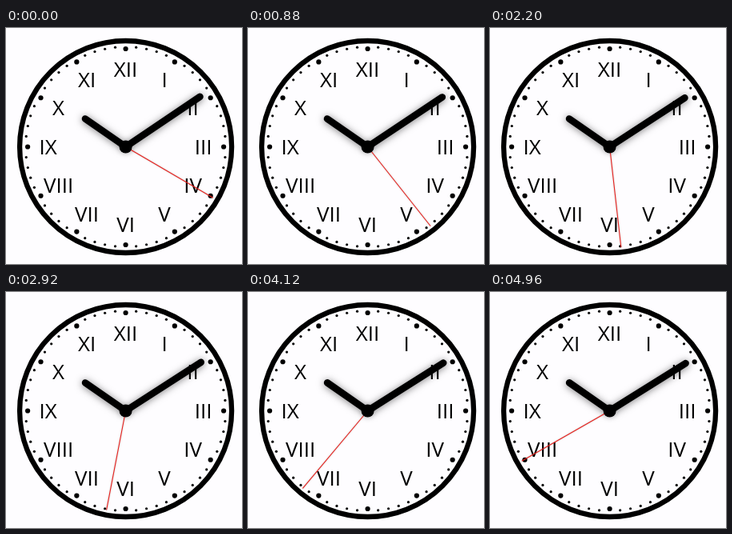
These frames come from a looping animation (295 by 295 pixels, 5 s). An HTML page with a canvas:

```html
<!DOCTYPE html>
<html lang="en">
<head>
<meta charset="utf-8">
<title>Clock</title>
<style>
  html, body { margin: 0; width: 100%; height: 100%; overflow: hidden; background: #fefdff; }
  canvas { display: block; }
</style>
</head>
<body>
<canvas id="clock" width="295" height="295"></canvas>
<script>
const ctx = document.getElementById('clock').getContext('2d');
const LOOP = 5000, STEP = 40;
const START = (10 * 60 + 9) * 60 + 20, SPAN = 20; // 10:09:20, twenty clock seconds per loop
const NUMERALS = 'XII I II III IV V VI VII VIII IX X XI'.split(' ');
const polar = (turn, r) => [r * Math.sin(turn * 2 * Math.PI), -r * Math.cos(turn * 2 * Math.PI)];

function disc(x, y, r) {
  ctx.beginPath();
  ctx.arc(x, y, r, 0, 2 * Math.PI);
  ctx.fill();
}

function hand(turn, length, width, color) {
  ctx.strokeStyle = color;
  ctx.lineWidth = width;
  ctx.beginPath();
  ctx.moveTo(0, 0);
  ctx.lineTo(...polar(turn, length));
  ctx.stroke();
}

function shadow(alpha, blur, dy) {
  ctx.shadowColor = `rgba(0,0,0,${alpha})`;
  ctx.shadowBlur = blur;
  ctx.shadowOffsetY = dy;
}

function drawFace() {
  ctx.strokeStyle = ctx.fillStyle = '#000';
  ctx.lineWidth = 6.3;
  ctx.beginPath();
  ctx.arc(0, 0, 132.5, 0, 2 * Math.PI);
  ctx.stroke();
  for (let i = 0; i < 60; i++) {
    if (i % 5) disc(...polar(i / 60, 125), 1.6);
    else disc(...polar(i / 60, 122.5), 3.1);
  }
  ctx.font = '26px "Open Sans", sans-serif';
  ctx.textAlign = 'center';
  NUMERALS.forEach((text, i) => {
    const [x, y] = polar(i / 12, 97);
    ctx.fillText(text, x, y + 9.3);
  });
}

function draw(now) {
  const progress = Math.floor((now % LOOP) / STEP) / (LOOP / STEP - 1);
  const seconds = START + SPAN * progress;
  ctx.clearRect(0, 0, 295, 295);
  ctx.save();
  ctx.translate(149.6, 148.5);
  drawFace();
  ctx.lineCap = 'round';
  shadow(0.5, 10, 1);
  hand(seconds / 43200, 61.5, 8.6, '#000');
  hand(seconds / 3600, 112, 8.6, '#000');
  shadow(0.25, 2, 0);
  hand((seconds + 0.05) / 60, 126, 1.1, '#e8201c');
  shadow(0, 0, 0);
  disc(0, 0, 8);
  ctx.restore();
  requestAnimationFrame(() => draw(performance.now()));
}

draw(0);
</script>
</body>
</html>
```
